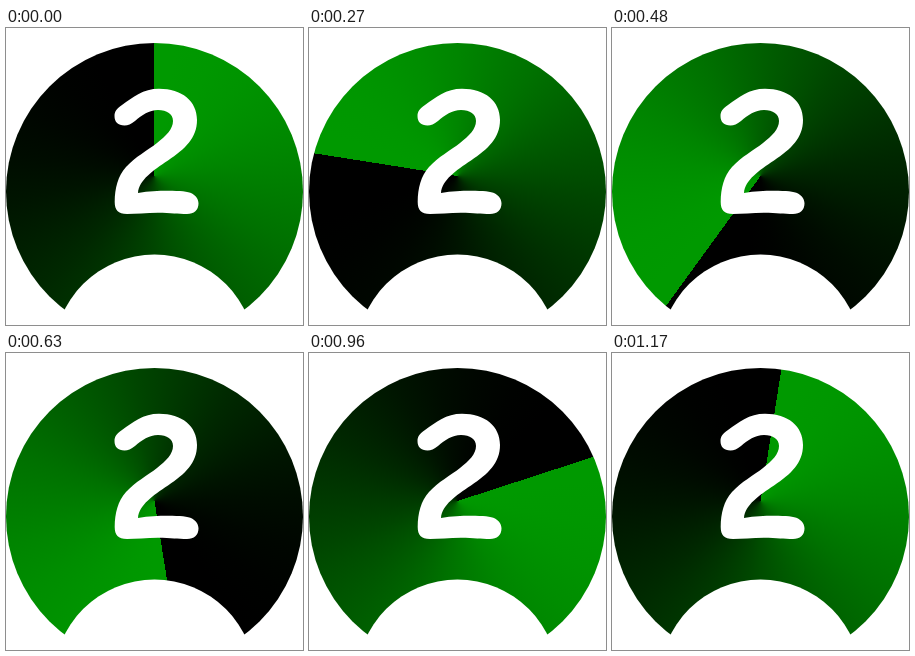
Animation of 297 by 297 pixels, one loop 1.2 s. Source, as an HTML page with a canvas:

```html
<!DOCTYPE html>
<html lang="en">
<head>
<meta charset="utf-8">
<title>Sweep dial</title>
<style>
  html, body { margin: 0; width: 100%; height: 100%; overflow: hidden; background: #fff; }
  canvas { display: block; width: 297px; height: 297px; }
</style>
</head>
<body>
<canvas id="stage"></canvas>
<script>
const SIZE = 297, LOOP = 1200, STEP = 30, STEPS = LOOP / STEP;
const MID = SIZE / 2;
const canvas = document.getElementById('stage');
const ctx = canvas.getContext('2d');
const ratio = window.devicePixelRatio || 1;
canvas.width = canvas.height = Math.round(SIZE * ratio);
ctx.scale(ratio, ratio);

const disc = { y: 163.5, r: 148.5 };
const bite = { y: 327.5, r: 101 };
const pivotY = 148;
const GREEN = 153, FADE = 0.95, STOPS = 40;

const digit = new Path2D(
  'M108.5 88C108.5 83 111 80.5 116 77C127 69 137 60.7 153 60.7C176 60.7 191 73 191 92' +
  'C191 110 179 121 162 132.5C147 142.5 133 152 132 165C143 163 152 162.7 162 162.7' +
  'C174 162.7 182 163.3 186 165.5C190 168 192.5 171 192.5 175.5C192.5 182 188 186 181 186' +
  'C172 186 165 184.7 152 184.7C140 184.7 130 186 121 186' +
  'C112 186 108.7 182 108.7 174C108.7 160 112 148 120 139C129 129 142 122 151 115' +
  'C160 108 167 101 167 93C167 86 161 82 152 82C143 82 136 87 129 93' +
  'C125 96 122 97.5 118.5 97.5C112 97.5 108.5 94 108.5 88Z');

function circle({ y, r }) {
  ctx.beginPath();
  ctx.arc(MID, y, r, 0, Math.PI * 2);
  ctx.fill();
}

// Cosine fade from green to black, clockwise from the edge
function sweepFrom(edge) {
  const sweep = ctx.createConicGradient(edge, MID, pivotY);
  for (let i = 0; i <= STOPS; i++) {
    const p = i / STOPS;
    const level = (1 + Math.cos(Math.PI * Math.min(1, p / FADE))) / 2;
    sweep.addColorStop(p, `rgb(0 ${Math.round(GREEN * level)} 0)`);
  }
  return sweep;
}

function draw(time) {
  const step = Math.floor((time % LOOP) / STEP);
  ctx.fillStyle = '#fff';
  ctx.fillRect(0, 0, SIZE, SIZE);
  ctx.fillStyle = sweepFrom(-Math.PI / 2 - step / STEPS * Math.PI * 2);
  circle(disc);
  ctx.fillStyle = '#fff';
  circle(bite);
  ctx.fill(digit);
}

const start = performance.now();
function tick() {
  draw(performance.now() - start);
  requestAnimationFrame(tick);
}
tick();
</script>
</body>
</html>
```
